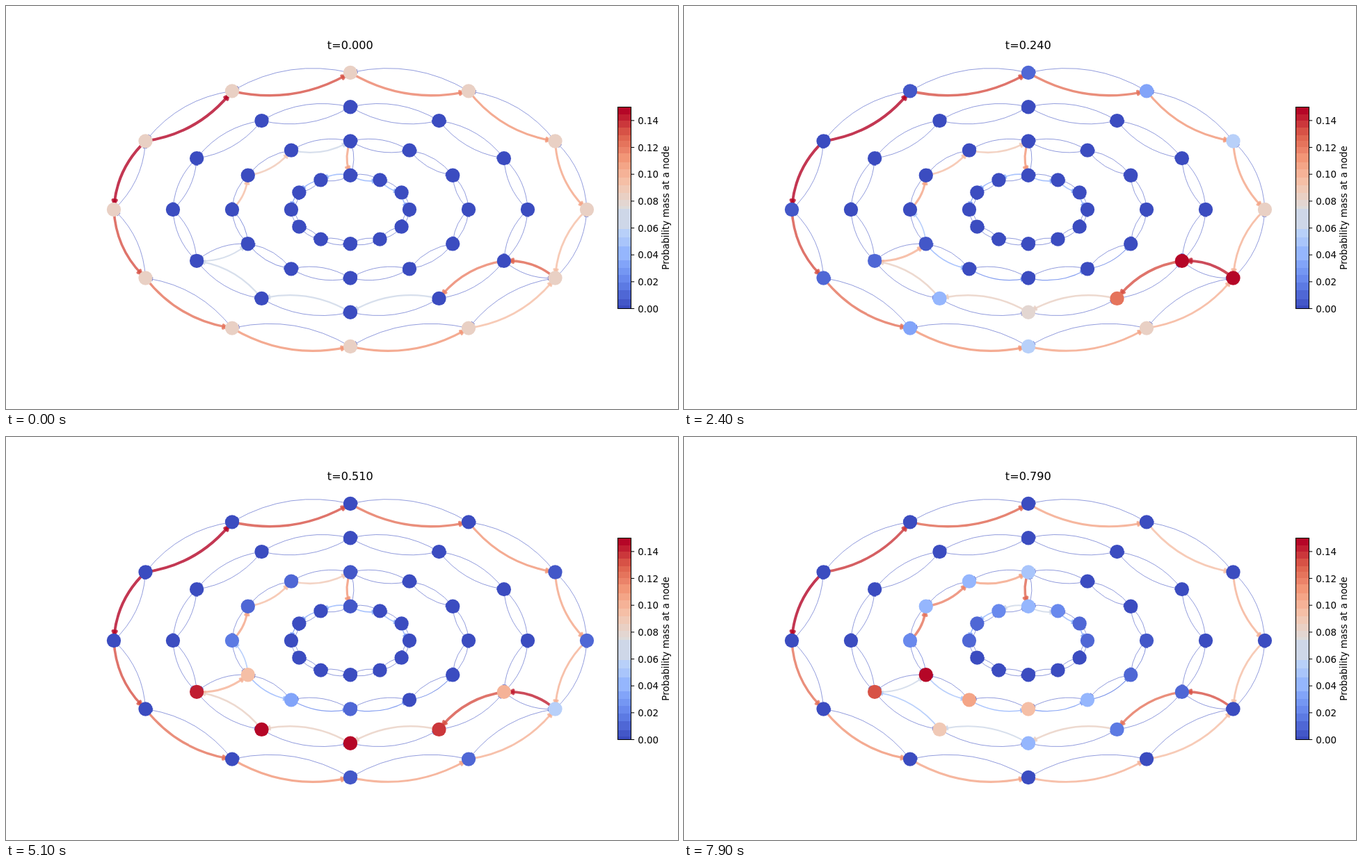
An HTML page that plays this animation: 966x580 px, repeating every 8 s.

```html
<!DOCTYPE html>
<html lang="en">
<head>
<meta charset="utf-8">
<title>Probability flow on rings</title>
<style>
  html, body { margin: 0; width: 100%; height: 100%; overflow: hidden; background: #fff; }
  svg { display: block; width: 966px; height: 580px; }
  text { font-family: "DejaVu Sans", sans-serif; font-size: 13.42px; }
</style>
</head>
<body>
<svg id="stage" viewBox="0 0 966 580"></svg>
<script>
const stage = document.getElementById('stage');
const STEPS = 80, STEP_MS = 100;
const BEND = 0.2, GAP = 4, HEAD_LENGTH = 5.37, HEAD_HALF = 2.69, ALPHA = 0.8;
const BAR = { x: 879.5, top: 145.5, width: 19, height: 290, max: 0.15 };

function add(tag, attrs, parent = stage) {
  const el = document.createElementNS('http://www.w3.org/2000/svg', tag);
  for (const name in attrs) el.setAttribute(name, attrs[name]);
  parent.appendChild(el);
  return el;
}
const clamp = x => Math.min(1, Math.max(0, x));
const mix = (a, b, k) => a + (b - a) * clamp(k);
const fixed = n => n.toFixed(2);

// Diverging blue-red scale, shown in bands
const STOPS = ['3b4cc0', '6282ea', '8db0fe', 'b8d0f9', 'dddcdc', 'f5c4ac', 'f49a7b', 'dd5f4b', 'b40426']
  .map(hex => [0, 2, 4].map(i => parseInt(hex.slice(i, i + 2), 16)));
const BANDS = [0, 5, 14, 27, 38, 49, 59, 70, 90, 103, 115, 144, 148, 157, 167, 178, 189,
  201, 211, 224, 233, 242, 250, 261, 271, 280, 290].map(px => px / 290);
function scale(u) {
  const pos = clamp(u) * (STOPS.length - 1), i = Math.min(Math.floor(pos), STOPS.length - 2);
  return `rgb(${STOPS[i].map((c, n) => Math.round(mix(c, STOPS[i + 1][n], pos - i)))})`;
}
const bandColors = BANDS.slice(1).map((hi, i) => scale(((hi + BANDS[i]) / 2 - 0.009) / 0.976));
function color(u) {
  const i = BANDS.findIndex(b => b > clamp(u));
  return bandColors[i < 0 ? bandColors.length - 1 : i - 1];
}

// Nodes: four rings of twelve, A outermost
const nodes = {};
[...'ABCD'].forEach((ring, r) => {
  for (let k = 0; k < 12; k++) {
    const angle = k * Math.PI / 6, size = 1 - r / 4;
    nodes[ring + k] = { x: 495 + 340 * size * Math.cos(angle), y: 293 - 197 * size * Math.sin(angle) };
  }
});

// link: [flow rate, strength at start, middle, end]
const flows = {
  'A5 A4': [10.8, .97, .97, .9], 'A4 A3': [17.5, .87, .89, .84],
  'A3 A2': [17, .79, .81, .7], 'A2 A1': [16, .74, .75, .65],
  'A1 A0': [14.5, .71, .72, .68], 'A0 A11': [12.5, .65, .66, .64],
  'A5 A6': [10.8, 1, .99, .97], 'A6 A7': [17.5, .87, .88, .82],
  'A7 A8': [17, .81, .81, .73], 'A8 A9': [16, .76, .76, .71],
  'A9 A10': [14.5, .74, .7, .68], 'A10 A11': [12.5, .65, .67, .65],
  'A11 B11': [12, .86, .94, .87], 'B11 B10': [11, .78, .88, .81],
  'B10 B9': [10.8, .43, .56, .56], 'B9 B8': [9.6, .45, .55, .4],
  'B8 B7': [8.6, .43, .55, .34], 'B7 C7': [7.8, .43, .69, .42],
  'C7 C6': [3.6, .04, .32, .05], 'C6 C5': [16, .62, .7, .83],
  'C5 C4': [14.5, .58, .63, .8], 'C4 C3': [14, .46, .6, .72],
  'C3 D3': [11.5, .72, .75, .86], 'C7 C8': [3.7, .04, .28, .35],
  'C8 C9': [4.6, 0, .14, .26], 'C9 C10': [2.8, 0, .15, .2],
  'C10 C11': [2.7, 0, .1, .12], 'C11 C0': [2.5, 0, 0, .04],
  'D3 D4': [5.5, .3, .3, .4], 'D4 D5': [6, .22, .22, .3], 'D5 D6': [6, .2, .2, .22],
  'D3 D2': [5.5, .3, .3, .4], 'D2 D1': [6, .26, .26, .3], 'D1 D0': [6, .22, .22, .24]
};

// Every neighbouring pair is linked both ways
const links = [];
function connect(a, b) {
  for (const [from, to] of [[a, b], [b, a]]) {
    const p = nodes[from], q = nodes[to];
    const ctrl = {
      x: (p.x + q.x) / 2 - BEND * (q.y - p.y),
      y: (p.y + q.y) / 2 + BEND * (q.x - p.x)
    };
    links.push({ from, to, p, q, ctrl, flow: flows[from + ' ' + to] });
  }
}
for (const ring of 'ABCD')
  for (let k = 0; k < 12; k++) connect(ring + k, ring + (k + 1) % 12);
connect('A11', 'B11');
connect('B7', 'C7');
connect('C3', 'D3');

// Master equation, integrated once; one snapshot per step
function surge(t) {
  return t < 0.68 ? mix(3.6, 5.5, (t - 0.55) / 0.13) : mix(5.5, 0.5, (t - 0.68) / 0.11);
}
function simulate() {
  const active = links.filter(l => l.flow), mass = {}, history = [], sub = 20, dt = 0.01 / sub;
  for (const id in nodes) mass[id] = id[0] === 'A' ? 1 / 12 : 0;
  for (let n = 0; n < STEPS * sub; n++) {
    if (n % sub === 0) history.push({ ...mass });
    const t = n * dt, growth = 0.85 + 0.9 * t;
    const moved = active.map(l =>
      mass[l.from] * (l.from + l.to === 'C7C6' ? surge(t) : l.flow[0]) * growth * dt);
    active.forEach((l, i) => { mass[l.from] -= moved[i]; mass[l.to] += moved[i]; });
  }
  return history;
}
const history = simulate();

function strength(link, t) {
  if (!link.flow) return 0;
  const [, start, middle, end] = link.flow;
  return t < 0.51 ? mix(start, middle, t / 0.1) : mix(middle, end, ((t - 0.51) / 0.28) ** 1.5);
}

function bezier({ p, ctrl, q }, s) {
  const at = axis => (1 - s) ** 2 * p[axis] + 2 * s * (1 - s) * ctrl[axis] + s * s * q[axis];
  return { x: at('x'), y: at('y') };
}

function drawLink(link, u) {
  if (link.shown === u) return;
  link.shown = u;
  const { p, ctrl, q } = link, width = 0.7 + 3.3 * u, margin = GAP + 1.118 * width;
  let lo = 0.5, hi = 1;
  for (let i = 0; i < 16; i++) {
    const mid = (lo + hi) / 2, b = bezier(link, mid);
    if (Math.hypot(b.x - q.x, b.y - q.y) > margin) lo = mid; else hi = mid;
  }
  const tip = bezier(link, lo);
  const c = { x: mix(p.x, ctrl.x, lo), y: mix(p.y, ctrl.y, lo) };
  const len = Math.hypot(tip.x - c.x, tip.y - c.y);
  const dx = (tip.x - c.x) / len, dy = (tip.y - c.y) / len;
  const corner = side => fixed(tip.x - HEAD_LENGTH * dx - side * HEAD_HALF * dy) + ' ' +
    fixed(tip.y - HEAD_LENGTH * dy + side * HEAD_HALF * dx);
  const end = fixed(tip.x) + ' ' + fixed(tip.y), paint = color(u);
  link.line.setAttribute('d', `M${fixed(p.x)} ${fixed(p.y)}Q${fixed(c.x)} ${fixed(c.y)} ${end}`);
  link.head.setAttribute('d', `M${corner(1)}L${end}L${corner(-1)}Z`);
  link.head.setAttribute('fill', paint);
  link.group.setAttribute('stroke', paint);
  link.group.setAttribute('stroke-width', fixed(width));
}

// Scene
const linkLayer = add('g', { 'stroke-opacity': ALPHA, 'fill-opacity': ALPHA, 'stroke-linejoin': 'round' });
for (const link of links) {
  link.group = add('g', {}, linkLayer);
  link.line = add('path', { fill: 'none' }, link.group);
  link.head = add('path', {}, link.group);
}
for (const id in nodes)
  nodes[id].dot = add('circle', { cx: fixed(nodes[id].x), cy: fixed(nodes[id].y), r: 10.16 });

const title = add('text', { x: 494.8, y: 61.8, 'text-anchor': 'middle', style: 'font-size:16.1px' });

const barY = u => BAR.top + BAR.height * (1 - u);
bandColors.forEach((fill, i) => add('rect', {
  x: BAR.x, y: barY(BANDS[i + 1]), width: BAR.width,
  height: BAR.height * (BANDS[i + 1] - BANDS[i]), fill, 'shape-rendering': 'crispEdges'
}));
add('rect', { x: BAR.x, y: BAR.top, width: BAR.width, height: BAR.height, fill: 'none', stroke: '#000', 'stroke-width': 1.07 });
for (let i = 0; i < 8; i++) {
  const value = i * 0.02, y = barY(value / BAR.max);
  add('path', { d: `M${BAR.x + BAR.width} ${y}h4.7`, stroke: '#000', 'stroke-width': 1.07 });
  add('text', { x: 908.3, y: y + 5 }).textContent = value.toFixed(2);
}
add('text', { transform: 'translate(952.6 290.5) rotate(-90)', 'text-anchor': 'middle' })
  .textContent = 'Probability mass at a node';

let current = -1;
function render(step) {
  if (step === current) return;
  current = step;
  const t = step / 100;
  title.textContent = 't=' + t.toFixed(3);
  for (const link of links) drawLink(link, strength(link, t));
  for (const id in nodes) nodes[id].dot.setAttribute('fill', color(history[step][id] / BAR.max));
}

const began = performance.now();
function tick() {
  render(Math.floor((performance.now() - began) / STEP_MS) % STEPS);
  requestAnimationFrame(tick);
}
render(0);
requestAnimationFrame(tick);
</script>
</body>
</html>
```
